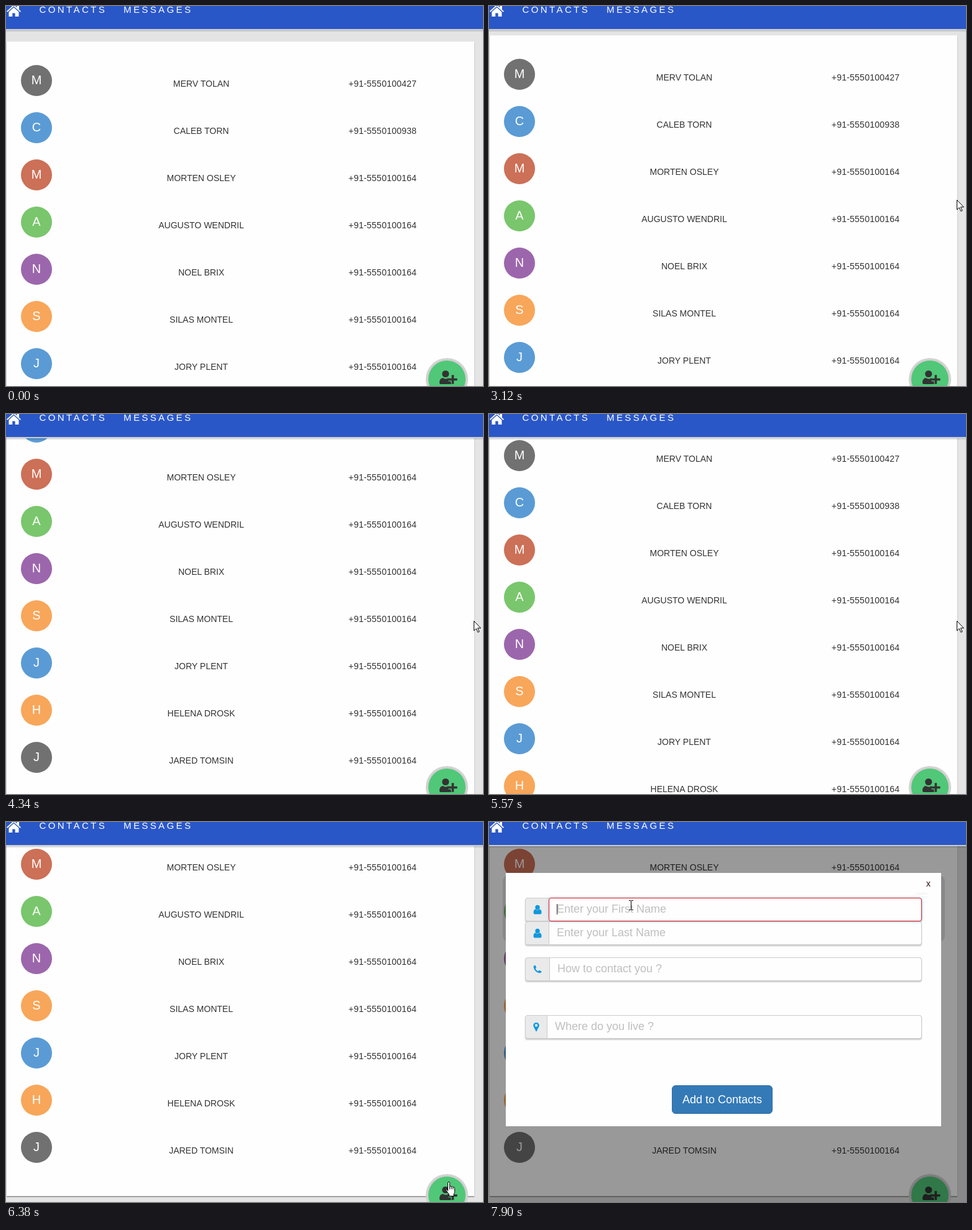
Recreate the animation shown at these times as an HTML page. Size 767 by 612 pixels, loop 8000 ms.

```html
<!DOCTYPE html>
<html lang="en">
<head>
<meta charset="utf-8">
<title>Contacts</title>
<style>
  html, body { margin: 0; width: 100%; height: 100%; overflow: hidden; }
  body { position: relative; background: #e4e4e4; color: #333; font: 14px "Liberation Sans", Arial, sans-serif; }
  div, header, svg { position: absolute; box-sizing: border-box; white-space: nowrap; }
  svg { overflow: visible; }
  header { left: 0; top: 0; width: 100%; height: 37px; background: #2a57c7; color: #fff;
    font-size: 15px; line-height: 12px; letter-spacing: 3.4px;
    box-shadow: 0 2px 0 #cbcbcf, 0 4px 1px rgba(0,0,0,.12); }
  #card { left: 0; top: 57px; width: 754px; height: 750px; background: #fefefe;
    border: 1px solid #ccc; border-top-color: #f4f4f4; border-radius: 2px;
    box-shadow: 0 2px 1px -1px rgba(0,0,0,.45); }
  .row { left: -1px; width: 752px; height: 50px; }
  .dot { left: 24px; width: 50px; height: 50px; border-radius: 50%; color: #fff;
    font-size: 20px; line-height: 48px; text-align: center; }
  .name, .phone { top: 20px; line-height: 20px; transform: translateX(-50%); }
  .name { left: 314px; }
  .phone { left: 605.5px; letter-spacing: .22px; }
  #fab { left: 679px; top: 571px; width: 60px; height: 60px; border-radius: 50%;
    background: #50c878; box-shadow: 0 0 1px 4px #d3d0d2; }
  #dialog { inset: 0; z-index: 0; }
  #shade { inset: 37px 0 0; background: rgba(0,0,0,.4); }
  #frame { left: 22px; top: 86px; width: 711px; height: 107px; border-radius: 9px; background: rgba(0,0,0,.1); }
  #panel { left: 27px; top: 82px; width: 700px; height: 408px; background: #fefefe; }
  .field { left: 58px; width: 638px; height: 38px; border-radius: 4px; background: #eaeaea;
    border: 1px solid #ccc; box-shadow: 0 2px 2px rgba(0,0,0,.2); }
  .input { height: 38px; background: #fefefe; border: 1px solid #ccc; border-radius: 0 4px 4px 0;
    padding-left: 12px; color: #bfbfbf; font-size: 18px; line-height: 34px; }
  #caret { left: 109px; top: 132px; width: 1px; height: 17px; background: #222; z-index: 2; }
  #add { left: 294px; top: 424px; width: 162px; height: 46px; border: 1px solid #2e6da4; border-radius: 6px;
    background: #337ab7; color: #fff; font-size: 18px; line-height: 44px; text-align: center; }
  #cursor { left: 0; top: 0; z-index: 1; }
</style>
</head>
<body>
<div id="card"></div>
<div id="fab">
  <svg width="60" height="60" fill="#333">
    <path d="M18 36q0-8 6-8q4 3 8 0q4 0 5 3v7h-16q-3 0-3-2z"/>
    <circle cx="27.8" cy="21.5" r="5.6"/>
    <path d="M39.5 23.5v14M32.5 30.5h14" stroke="#50c878" stroke-width="6"/>
    <path d="M39.4 23.3v14.4M32.2 30.5h14.4" stroke="#333" stroke-width="3.6"/>
  </svg>
</div>
<div id="dialog">
  <div id="shade"></div>
  <div id="frame"></div>
  <div id="panel"></div>
  <div style="left:687px;top:114px;width:17px;height:3px;background:#f6f6f6"></div>
  <div style="left:703px;top:92px;line-height:15px;color:#301010">x</div>
  <div id="fields"></div>
  <div id="caret"></div>
  <div id="add">Add to Contacts</div>
</div>
<header>
  <svg width="26" height="18" fill="#fff">
    <path d="M1 8.5L12.5-2 24 8.5 22.8 9.8 12.5.6 2.2 9.8zM17.5-1h3.5v7l-3.5-3z"/>
    <path d="M4.5 9.5L12.5 2.3 20.5 9.500V17H14.700V11.500H10.300V17H4.500z"/>
  </svg>
  <div style="left:53.500px">CONTACTS</div>
  <div style="left:189px">MESSAGES</div>
</header>
<svg id="cursor" width="20" height="26">
  <path id="arrow" d="M.5.5v15.500l3.600-3.400 2.700 5.900 2.300-1-2.700-5.700h5z" fill="#fff" stroke="#000"/>
  <path id="hand" d="M3.500 15V2.300q0-1.800 1.500-1.800t1.500 1.800v5.700q1.500-1 2.700.400q1.500-.800 2.600.600q2.700-.500 2.700 2.200v5.300q0 2-1.500 4v3h-7.500v-2.500L.900 14.500q-.800-2.200 1-2.300zM6.500 8v4.500M9.200 8.500v4M11.800 9.500v3"
    fill="#fff" stroke="#000"/>
  <path id="beam" d="M0 .5h3M4 .5h3M3.500 1v14M0 15.500h3M4 15.500h3" fill="none" stroke="#000"/>
</svg>
<script>
const $ = id => document.getElementById(id);
const [gray, blue, red, green, purple, orange] =
  ['#717171', '#5a9bd5', '#cc7057', '#79c66c', '#9c66ac', '#f8a65a'];

const contacts = [
  ['MERV TOLAN', gray, '0427'], ['CALEB TORN', blue, '0938'], ['MORTEN OSLEY', red],
  ['AUGUSTO WENDRIL', green], ['NOEL BRIX', purple], ['SILAS MONTEL', orange],
  ['JORY PLENT', blue], ['HELENA DROSK', orange], ['JARED TOMSIN', gray]
];
$('card').innerHTML = contacts.map(([name, color, tail = '0164'], i) =>
  `<div class="row" style="top:${37 + 76 * i}px">
    <div class="dot" style="background:${color}">${name[0]}</div>
    <div class="name">${name}</div><div class="phone">+91-555010${tail}</div>
  </div>`).join('');

const user = 'M-6.500 5q0-5.500 3.500-5.500q3 2.500 6 0q3.500 0 3.500 5.500q0 2.500-2 2.500h-9q-2 0-2-2.500zM-3.700-3.500a3.700 3.700 0 1 1 7.400 0a3.700 3.700 0 1 1-7.400 0z';
const phone = 'M-6.500-3.500Q-6.500-6-3.500-6.300L-1.800-2.600-3.400-1Q-2 2 1 3.400L2.600 1.800 6.500 3.500Q6.200 6.300 3.500 6.300Q-5 5-6.500-3.500z';
const pin = 'M0 8L-4.200-.3A4.700 4.700 0 1 1 4.200-.3zM-2.200-2.500a2.200 2.200 0 1 0 4.400 0a2.200 2.200 0 1 0-4.400 0z';
// top, input left edge, icon, placeholder
const fields = [
  [122, 96, user, 'Enter your First Name'], [160, 96, user, 'Enter your Last Name'],
  [218, 97, phone, 'How to contact you ?'], [311, 93, pin, 'Where do you live ?']
];
$('fields').innerHTML = fields.map(([top, left, icon, label]) =>
  `<div class="field" style="top:${top}px"></div>
  <svg style="left:${(58 + left) / 2 + .5}px;top:${top + 19}px" width="1" height="1">
    <path d="${icon}" fill="#0e98dd" fill-rule="${icon === pin ? 'evenodd' : 'nonzero'}"/></svg>
  <div class="input" style="top:${top}px;left:${left}px;width:${696 - left}px">${label}</div>`).join('');
const first = document.querySelector('.input');
first.style.zIndex = 1;

// Each track holds its value until the next key time.
const scroll = [[0, 0], [3120, 10], [3270, 90], [3390, 178], [3510, 204], [4340, 175],
  [4480, 88], [4600, 0], [5570, 53], [5720, 202], [5870, 204]];
const focus = [[0, 0], [7640, .5], [7760, .9], [7900, 1]];
const pointer = [
  [0, '', 0, 0], [500, 'arrow', 760, 222], [620, 'arrow', 755, 255], [740, 'arrow', 753, 280],
  [860, 'arrow', 752, 295], [1020, 'arrow', 752, 306], [1160, 'arrow', 752, 307],
  [1410, 'arrow', 752, 312], [3790, 'arrow', 752, 317], [3940, 'arrow', 752, 324],
  [4060, 'arrow', 752, 333], [5720, 'arrow', 740, 380], [5870, 'arrow', 724, 440],
  [5990, 'arrow', 712, 510], [6110, 'hand', 704, 557], [6260, 'hand', 705, 570],
  [6380, 'hand', 707, 579], [7080, 'arrow', 480, 285], [7210, 'beam', 263, 132],
  [7360, 'beam', 232, 118], [7480, 'beam', 225, 116], [7640, 'beam', 225, 126]
];
const at = (track, t) => track.findLast(key => key[0] <= t);
const show = (id, on) => $(id).style.display = on ? '' : 'none';

function draw(now) {
  const t = now % 8000;
  $('card').style.transform = `translateY(${-at(scroll, t)[1]}px)`;
  show('dialog', t >= 6650);

  const k = at(focus, t)[1];
  first.style.borderColor = `rgb(${204 + 23 * k},${204 - 180 * k},${204 - 175 * k})`;
  first.style.borderRadius = k ? '4px' : '';
  first.style.boxShadow = `0 0 4px rgba(102,175,233,${.6 * k})`;
  show('caret', k);

  const [, kind, x, y] = at(pointer, t);
  for (const id of ['arrow', 'hand', 'beam']) show(id, id === kind);
  $('cursor').style.transform = `translate(${x}px,${y}px)`;
  requestAnimationFrame(draw);
}
draw(0);
</script>
</body>
</html>
```
